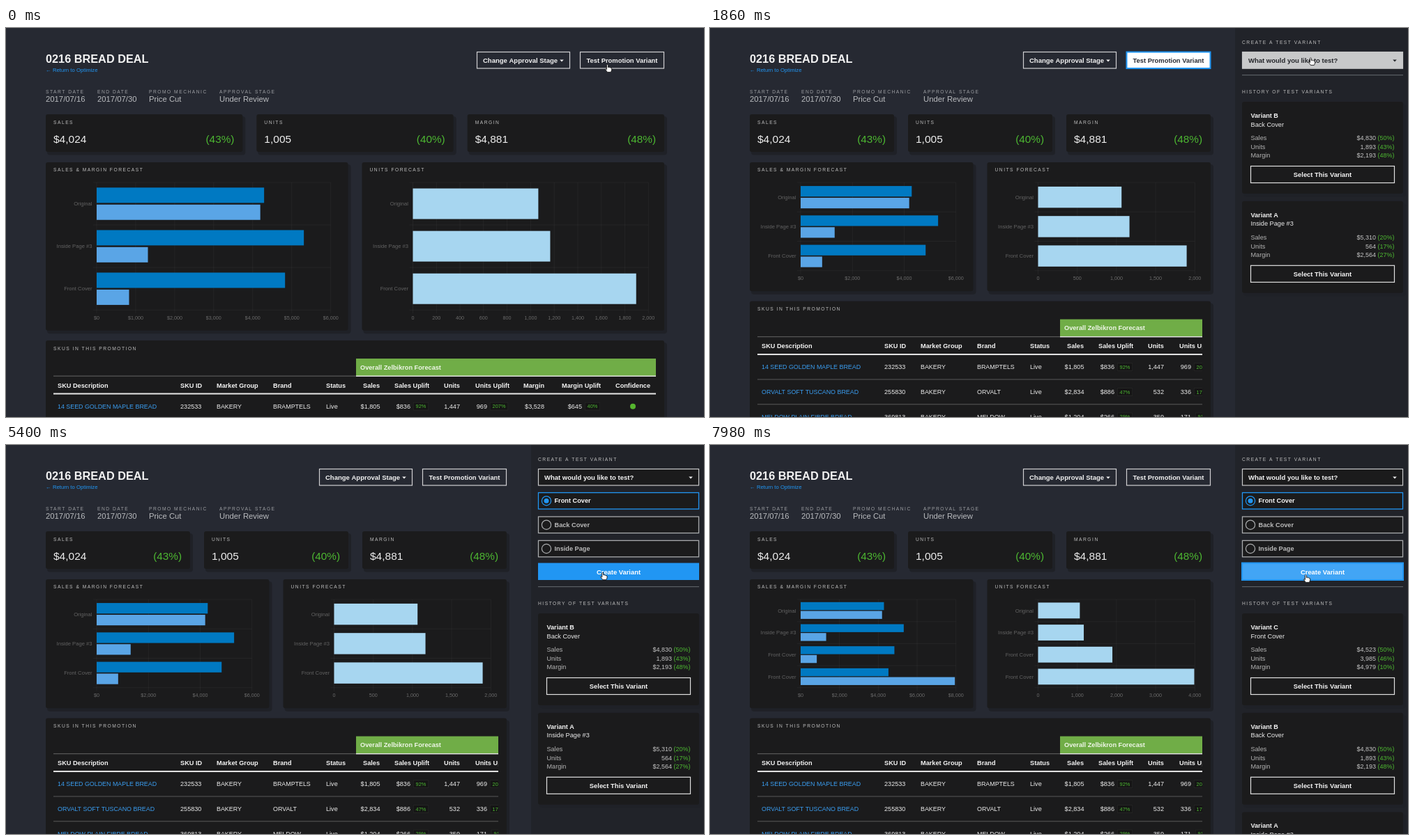
An HTML page with a canvas for the animation above (8 s loop, 1001 by 559 pixels).

```html
<!DOCTYPE html>
<html lang="en">
<head>
<meta charset="utf-8">
<title>Promotion test variants</title>
<style>
  html, body { margin: 0; width: 100%; height: 100%; overflow: hidden; background: #262932; }
  canvas { display: block; width: 1001px; height: 559px; }
</style>
</head>
<body>
<canvas id="stage"></canvas>
<script>
const W = 1001, H = 559, LOOP = 8000;
const canvas = document.getElementById('stage');
const ctx = canvas.getContext('2d');
const dpr = window.devicePixelRatio || 1;
canvas.width = W * dpr;
canvas.height = H * dpr;

const BLUE = '#2196f3', GREEN = '#4db832', CARD = '#1b1b1c', SHADOW = '#1f2127';

// Moments of the interaction, in ms
const AT = { press: 140, open: 1980, pick: 2940, radio: 4620, create: 6360, result: 7026 };

// time, x, y of the pointer
const POINTER = [
  [0, 864, 58], [280, 864, 58], [600, 863, 48], [2060, 863, 48], [2460, 857.5, 85],
  [4760, 857.5, 85], [5340, 857.5, 188], [5700, 856, 192], [LOOP, 856, 192]
];

const FORECAST = [
  { name: 'Original', sales: 4292, margin: 4194, units: 1065 },
  { name: 'Inside Page #3', sales: 5311, margin: 1314, units: 1166 },
  { name: 'Front Cover', sales: 4829, margin: 831, units: 1896 },
  { name: 'Front Cover', sales: 4523, margin: 7945, units: 3985 }
];

const SKUS = [
  ['14 SEED GOLDEN MAPLE BREAD', '232533', 'BRAMPTELS', '$1,805', '$836', '92%', '1,447', '969', '207%', '$3,528', '$645', '40%'],
  ['ORVALT SOFT TUSCANO BREAD', '255830', 'ORVALT', '$2,834', '$886', '47%', '532', '336', '172%', '$2,410', '$512', '31%'],
  ['MELDOW PLAIN FIBRE BREAD', '369813', 'MELDOW', '$1,204', '$266', '29%', '359', '171', '91%', '$1,118', '$204', '22%']
];

const VARIANTS = {
  C: ['Front Cover', '$4,523', '50%', '3,985', '46%', '$4,979', '10%'],
  B: ['Back Cover', '$4,830', '50%', '1,893', '43%', '$2,193', '48%'],
  A: ['Inside Page #3', '$5,310', '20%', '564', '17%', '$2,564', '27%']
};

const clamp = v => Math.min(1, Math.max(0, v));
const lerp = (a, b, k) => a + (b - a) * k;
const ramp = (t, from, to) => clamp((t - from) / (to - from));
const mix = (a, b, k) => `rgb(${a.map((v, i) => Math.round(lerp(v, b[i], k)))})`;

function fill(x, y, w, h, color) {
  ctx.fillStyle = color;
  ctx.fillRect(x, y, w, h);
}

function frame(x, y, w, h, color, line = 1.2) {
  ctx.strokeStyle = color;
  ctx.lineWidth = line;
  ctx.strokeRect(x + 0.5, y + 0.5, w - 1, h - 1);
}

function rounded(x, y, w, h, r, color) {
  ctx.fillStyle = color;
  ctx.beginPath();
  ctx.roundRect(x, y, w, h, r);
  ctx.fill();
}

function card(x, y, w, h) {
  rounded(x + 2, y + 3, w + 2, h + 1.5, 4, SHADOW);
  rounded(x, y, w, h, 3, CARD);
}

// y is the middle of the capitals
function text(str, x, y, size, color, { bold, align = 'left', space = 0 } = {}) {
  ctx.font = `${bold ? 'bold ' : ''}${size}px "Liberation Sans", Arial, Helvetica, sans-serif`;
  ctx.letterSpacing = space + 'px';
  ctx.textAlign = align;
  ctx.fillStyle = color;
  ctx.fillText(str, x, y + size * 0.36);
  return ctx.measureText(str).width;
}

const label = (str, x, y, color = '#bcbcbc') => text(str, x, y, 6.7, color, { space: 1.5 });

function caret(x, y, color) {
  ctx.fillStyle = color;
  ctx.beginPath();
  ctx.moveTo(x - 2.8, y - 1.4);
  ctx.lineTo(x + 2.8, y - 1.4);
  ctx.lineTo(x, y + 1.6);
  ctx.fill();
}

function disc(x, y, r, color) {
  ctx.fillStyle = color;
  ctx.beginPath();
  ctx.arc(x, y, r, 0, 7);
  ctx.fill();
}

function header(t, right) {
  text('0216 BREAD DEAL', 57, 44, 16.3, '#f2f2f2', { bold: true });
  text('← Return to Optimize', 57, 60.5, 7.75, BLUE);
  [['START DATE', '2017/07/16', 57], ['END DATE', '2017/07/30', 131],
   ['PROMO MECHANIC', 'Price Cut', 205], ['APPROVAL STAGE', 'Under Review', 306]
  ].forEach(([name, value, x]) => {
    label(name, x, 92, '#9b9da1');
    text(value, x, 102, 11.3, '#b9bbbe');
  });

  frame(right - 269, 34, 134, 24.5, '#d0d0d2');
  text('Change Approval Stage', right - 260, 46.3, 9.5, '#f2f2f2', { bold: true });
  caret(right - 147, 47, '#f2f2f2');

  const lit = t < AT.open ? ramp(t, 60, 200) : 0;
  if (lit) fill(right - 121, 34, 121, 24.5, `rgba(255,255,255,${lit})`);
  const focused = t > AT.press && t < AT.open;
  frame(right - 121, 34, 121, 24.5, focused ? BLUE : '#d0d0d2', focused ? 2 : 1.2);
  text('Test Promotion Variant', right - 60.5, 46.3, 9.4, mix([242, 242, 242], [38, 41, 50], lit),
    { bold: true, align: 'center' });
}

function totals(width) {
  const w = (width - 40) / 3;
  [['SALES', '$4,024', '(43%)'], ['UNITS', '1,005', '(40%)'], ['MARGIN', '$4,881', '(48%)']].forEach((s, i) => {
    const x = 57 + i * (w + 20);
    card(x, 124, w, 54);
    label(s[0], x + 11, 135.5);
    text(s[1], x + 11, 159, 15.5, '#ededed');
    text(s[2], x + w - 12, 159, 15.3, GREEN, { align: 'right' });
  });
}

function chart({ title, x, w, keys, colors, pad, money, max, oldMax, step, grow, rows }) {
  const left = x + 73, right = x + w - 11 - pad, top = 222;
  const bottom = top + (w - 22) / 2 - 22.5;
  const pitch = (bottom - top) / rows, span = right - left;
  card(x, 193, w, (w - 22) / 2 + 36);
  label(title, x + 11, 204);

  const faint = 'rgba(255,255,255,.045)';
  for (let v = 0; v <= max; v += step) {
    const tx = left + span * v / max;
    fill(tx - 0.5, top, 1, bottom - top + 5, faint);
    text((money ? '$' : '') + v.toLocaleString('en-US'), tx, bottom + 10.7, 7.2, '#6a6a6a', { align: 'center' });
  }
  for (let i = 0; i <= rows; i++) fill(left - 5, top + i * pitch - 0.5, span + 5, 1, faint);
  for (let i = 0; i < rows; i++)
    text(FORECAST[i].name, left - 6.5, top + (i + 0.5) * pitch, 7.65, '#626262', { align: 'right' });

  // Rows already shown glide from the three-row layout; a new one grows from zero
  const n = keys.length;
  for (let k = n - 1; k >= 0; k--) {
    for (let i = 0; i < rows; i++) {
      const value = FORECAST[i][keys[k]];
      const from = i < 3 ? (bottom - top) / 3 : pitch;
      const slot = p => top + p * (i + 0.5 + 0.8 * ((k + 0.5) / n - 0.5));
      const h = lerp(from, pitch, grow) * 0.72 / n;
      const length = lerp(i < 3 ? value / oldMax : 0, value / max, grow) * span;
      fill(left, lerp(slot(from), slot(pitch), grow) - h / 2, length, h, colors[k]);
    }
  }
}

function charts(t, width) {
  const w = (width - 20) / 2;
  const done = t >= AT.result;
  const grow = done ? 1 - (1 - ramp(t, AT.result, AT.result + 1000)) ** 4 : 1;
  const rows = done ? 4 : 3;
  chart({
    title: 'SALES & MARGIN FORECAST', x: 57, w, keys: ['sales', 'margin'], colors: ['#0079c2', '#5aa5e6'],
    pad: 13.8, money: true, max: done ? 8000 : 6000, oldMax: 6000, step: w > 390 ? 1000 : 2000, grow, rows
  });
  chart({
    title: 'UNITS FORECAST', x: 77 + w, w, keys: ['units'], colors: ['#a7d6f0'],
    pad: 11.7, max: done ? 4000 : 2000, oldMax: 2000, step: done ? 1000 : w > 390 ? 200 : 500, grow, rows
  });
  return 243.3 + (w - 22) / 4 * 2;
}

function tag(str, x, y) {
  const w = str.length * 4.2 + 10;
  fill(x - w / 2, y - 6, w, 12, '#151515');
  frame(x - w / 2, y - 6, w, 12, '#262626', 1);
  text(str, x, y, 7.4, GREEN, { align: 'center' });
}

function table(top, right) {
  card(57, top, right - 57, 300);
  label('SKUS IN THIS PROMOTION', 68, top + 11.5);
  ctx.save();
  ctx.beginPath();
  ctx.rect(68, top, right - 80, 300);
  ctx.clip();

  fill(68, top + 50.5, 434, 1.2, '#5a5a5a');
  fill(502, top + 26, 430, 25, '#70ad47');
  fill(502, top + 50.5, 430, 1.4, '#e8e8e8');
  text('Overall Zelbikron Forecast', 508, top + 38.5, 9.2, '#eff6e8', { bold: true });
  [['SKU Description', 74], ['SKU ID', 250], ['Market Group', 302], ['Brand', 383], ['Status', 459],
   ['Sales', 512], ['Sales Uplift', 557], ['Units', 628], ['Units Uplift', 673], ['Margin', 742],
   ['Margin Uplift', 797], ['Confidence', 874]
  ].forEach(([name, x]) => text(name, x, top + 64.3, 9.2, '#f4f4f4', { bold: true }));
  fill(68, top + 75.5, 864, 2, '#e6e6e6');

  SKUS.forEach((s, i) => {
    const y = top + 94.6 + i * 35.7;
    const cell = (str, x, align = 'right', size = 9.15) => text(str, x, y, size, '#ececec', { align });
    text(s[0], 74, y, 8.9, '#3a9df0');
    cell(s[1], 250, 'left');
    cell('BAKERY', 302, 'left', 8.9);
    cell(s[2], 383, 'left', 8.9);
    cell('Live', 459, 'left');
    cell(s[3], 536.5);
    cell(s[4], 580);
    tag(s[5], 595, y);
    cell(s[6], 651);
    cell(s[7], 690);
    tag(s[8], 707, y);
    cell(s[9], 772);
    cell(s[10], 826);
    tag(s[11], 841, y);
    disc(899, y, 4, '#55b52e');
    fill(68, y + 17.2, 864, 1.3, '#4b4b4b');
  });
  ctx.restore();
}

function variant(name, x, y) {
  const [place, ...v] = VARIANTS[name];
  card(x, y, 231, 132);
  text('Variant ' + name, x + 12.5, y + 19.6, 9.1, '#f4f4f4', { bold: true });
  text(place, x + 12.5, y + 32.3, 9.2, '#ececec');
  ['Sales', 'Units', 'Margin'].forEach((row, i) => {
    const ry = y + 52 + i * 12.6;
    text(row, x + 12.5, ry, 9.1, '#b4b4b4');
    const w = text(`(${v[i * 2 + 1]})`, x + 218.5, ry, 9, GREEN, { align: 'right' });
    text(v[i * 2], x + 216 - w, ry, 9, '#c4c4c4', { align: 'right' });
  });
  frame(x + 12, y + 92, 207, 25, '#e0e0e0');
  text('Select This Variant', x + 115.5, y + 104.9, 9.4, '#f4f4f4', { bold: true, align: 'center' });
}

function radio(name, x, y, hover, chosen) {
  const edge = chosen ? BLUE : hover ? '#f4f4f4' : '#a9abad';
  fill(x, y - 12, 231, 24.5, CARD);
  frame(x, y - 12, 231, 24.5, edge, 1.3);
  ctx.strokeStyle = edge;
  ctx.lineWidth = 1.2;
  ctx.beginPath();
  ctx.arc(x + 12, y + 0.2, 6.6, 0, 7);
  ctx.stroke();
  if (chosen) disc(x + 12, y + 0.2, 3.5, BLUE);
  text(name, x + 23.5, y, 9.2, hover || chosen ? '#f6f6f6' : '#b9b9b9', { bold: true });
}

function dropdown(x, t) {
  fill(x, 59, 231, 84.5, '#000');
  frame(x, 59.5, 231, 84, '#a8a8a8', 1.1);
  const hover = ramp(t, 2280, 2400);
  fill(x + 1, 63, 229, 26.5, `rgba(66,70,71,${hover})`);
  ['Flyer Location', 'Promotion Mechanic', 'Vendor Funding'].forEach((name, i) =>
    text(name, x + 9, 76.5 + i * 25.1, 9.4, '#f0f0f0'));
}

function sidebar(t, left) {
  const x = left + 10;
  fill(left, 0, W, H, '#212329');
  label('CREATE A TEST VARIANT', x, 20.5);

  const picked = t >= AT.pick, chosen = t >= AT.radio;
  const hover = picked ? 1 - ramp(t, AT.pick, AT.pick + 150) : ramp(t, 590, 790);
  fill(x, 34, 231, 24.5, mix([27, 27, 28], [200, 201, 202], hover));
  frame(x, 34, 231, 24.5, '#c8c9ca');
  const ink = mix([244, 244, 244], [36, 38, 42], ramp(hover, 0.3, 1));
  text('What would you like to test?', x + 9, 46.3, 9.5, ink, { bold: true });
  caret(x + 219, 46.8, ink);

  if (picked) {
    radio('Front Cover', x, 80, true, chosen);
    radio('Back Cover', x, 114.5);
    radio('Inside Page', x, 148.8);
  }
  if (chosen) {
    fill(x, 169.5, 231, 24.5, mix([33, 150, 243], [66, 165, 245], ramp(t, 5420, 5600)));
    if (t > AT.create) frame(x - 0.5, 169, 232, 25.5, BLUE, 2);
    text('Create Variant', x + 115.5, 182.2, 9.4, '#fff', { bold: true, align: 'center' });
  }

  const shift = chosen ? 136 : picked ? 103 : 0;
  fill(x, 67 + shift, 231, 1.2, '#5b5f64');
  label('HISTORY OF TEST VARIANTS', x, 92 + shift);
  const list = t >= AT.result ? 'CBA' : 'BA';
  [...list].forEach((name, i) => variant(name, x, 106 + shift + i * 142.8));
  if (t >= AT.open && !picked) dropdown(x, t);
}

function pointer(t) {
  const i = Math.max(1, POINTER.findIndex(p => p[0] > t));
  const [t0, x0, y0] = POINTER[i - 1], [t1, x1, y1] = POINTER[i];
  const k = ramp(t, t0, t1), e = k * k * (3 - 2 * k);
  ctx.save();
  ctx.translate(lerp(x0, x1, e), lerp(y0, y1, e));
  ctx.fillStyle = '#fff';
  ctx.strokeStyle = '#111';
  ctx.lineWidth = 0.9;
  ctx.beginPath();
  ctx.moveTo(-2.6, 1.6);
  ctx.lineTo(-2.6, -4.4);
  ctx.quadraticCurveTo(-1.6, -6.4, -0.6, -4.4);
  ctx.lineTo(-0.6, -1.4);
  ctx.quadraticCurveTo(0.6, -2.4, 1.4, -1.2);
  ctx.quadraticCurveTo(2.6, -1.8, 3.2, -0.6);
  ctx.quadraticCurveTo(4.8, -0.8, 4.8, 0.8);
  ctx.quadraticCurveTo(4.8, 3.4, 3.4, 5.4);
  ctx.lineTo(-1.6, 5.4);
  ctx.quadraticCurveTo(-3, 3.4, -4.8, 1.2);
  ctx.quadraticCurveTo(-4.6, -0.4, -2.6, 1.6);
  ctx.fill();
  ctx.stroke();
  ctx.restore();
}

function draw(t) {
  ctx.setTransform(dpr, 0, 0, dpr, 0, 0);
  fill(0, 0, W, H, '#262932');
  const slide = 1 - (1 - ramp(t, AT.press, AT.press + 700)) ** 3;
  const right = lerp(944, 718, slide);
  header(t, right);
  totals(right - 57);
  table(charts(t, right - 57), right);
  sidebar(t, lerp(1153, 753, slide));
  pointer(t);
}

const start = performance.now();
function tick() {
  draw((performance.now() - start) % LOOP);
  requestAnimationFrame(tick);
}
tick();
</script>
</body>
</html>
```
